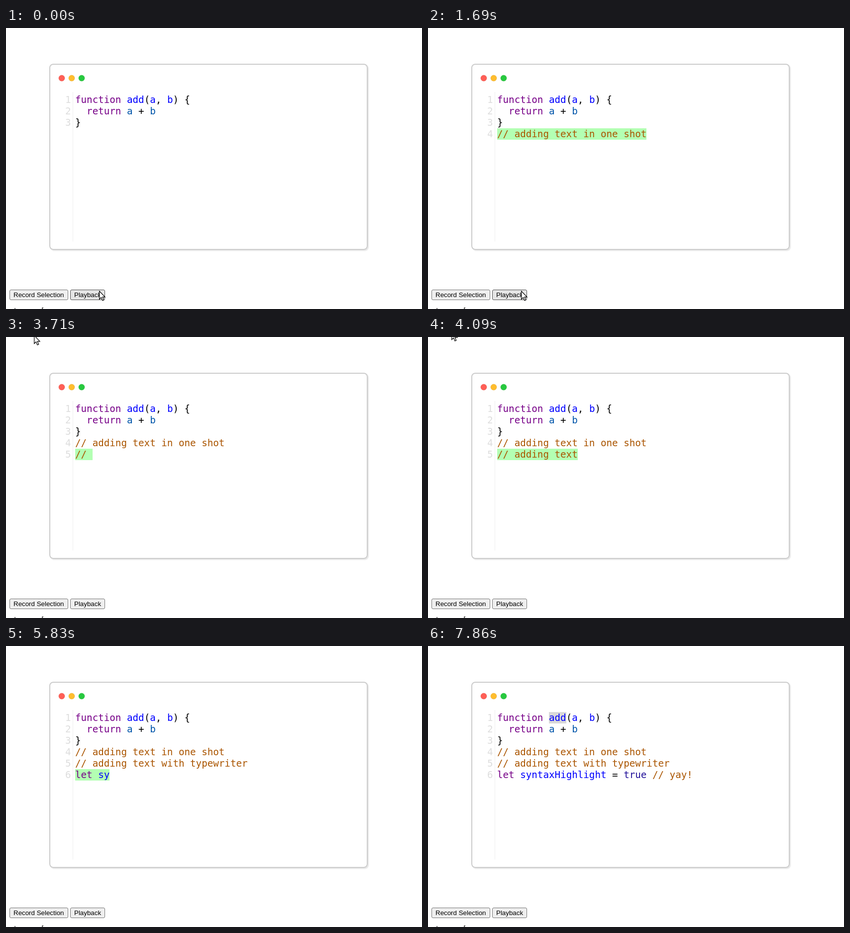
Recreate the animation shown at these times as an HTML page. Size 836 px wide and 566 px high, loop 8 s.

```html
<!DOCTYPE html>
<html lang="en">
<head>
<meta charset="utf-8">
<title>Code playback</title>
<style>
  html, body { margin: 0; width: 100%; height: 100%; overflow: hidden; background: #fff; }
  body { position: relative; }
  body > * { position: absolute; }
  .window {
    left: 87px; top: 72px; width: 640px; height: 375px; box-sizing: border-box;
    border: 2px solid #ccc; border-radius: 8px; box-shadow: 2px 2px 2px rgba(0, 0, 0, .1);
  }
  .lights { left: 105px; top: 94px; }
  .gutter { left: 134px; top: 129px; width: 1px; height: 301px; background: #eee; }
  #numbers, #code { top: 133px; font: 19.2px/23px "DejaVu Sans Mono", monospace; white-space: pre; }
  #numbers { left: 119px; color: #ddd; }
  #code { left: 139px; color: #000; }
  #code div { height: 23px; }
  .added, .selected { display: inline-block; height: 23px; vertical-align: top; }
  .added { background: #b3ffb3; }
  .selected { background: #d9d9d9; }
  .keyword { color: #708; }
  .def { color: #00f; }
  .local { color: #05a; }
  .atom { color: #219; }
  .comment { color: #a50; }
  .button {
    top: 527px; height: 21px; box-sizing: border-box; padding: 0 7px;
    border: 1px solid #767676; border-radius: 3px; background: #efefef; color: #000;
    font: 13.333px/19px "Liberation Sans", Arial, sans-serif; white-space: nowrap;
  }
  .button.hover { background: #e5e5e5; border-color: #4f4f4f; }
  .button.active { background: #f5f5f5; border-color: #8d8d8d; }
  .steps { left: 7px; top: 561px; margin: 0; font: 13px/15px "DejaVu Sans Mono", monospace; }
  #pointer { left: 0; top: 0; }
</style>
</head>
<body>
<div class="window"></div>
<svg class="lights" width="54" height="14" stroke-width=".5">
  <circle cx="7" cy="7" r="6" fill="#ff5f56" stroke="#e0443e"/>
  <circle cx="27" cy="7" r="6" fill="#ffbd2e" stroke="#dea123"/>
  <circle cx="47" cy="7" r="6" fill="#27c93f" stroke="#1aab29"/>
</svg>
<div class="gutter"></div>
<div id="numbers"></div>
<div id="code"></div>
<div class="button" style="left:7px">Record Selection</div>
<div class="button" id="playback" style="left:129px">Playback</div>
<pre class="steps">steps = [</pre>
<svg id="pointer" width="14" height="22">
  <path d="M.7 1V17.3L4.4 13.8L7 20L9.7 18.9L7.1 12.8H12Z" fill="#fff" stroke="#000" stroke-width="1.2"/>
</svg>
<script>
const DURATION = 8000;
const BASE = ['function add(a, b) {', '  return a + b', '}'];

// number: when the empty line appears; typed: [time, visible characters]; settled: highlight ends
const ADDITIONS = [
  { text: '// adding text in one shot', number: 690, settled: 2490, typed: [[1690, 26]] },
  { text: '// adding text with typewriter', number: 2660, settled: 5170,
    typed: [[3710, 3], [3830, 7], [3940, 10], [4090, 14], [4200, 18], [4340, 22], [4490, 26], [4600, 30]] },
  { text: 'let syntaxHighlight = true // yay!', number: 4690, settled: 7140,
    typed: [[5830, 6], [6000, 11], [6140, 16], [6310, 20], [6540, 28], [6710, 33], [6830, 34]] },
];
const POINTER = [[0, [187, 529]], [2000, [308, 523]], [2230, null], [3400, [56, -4]],
  [3940, [54, -5]], [4090, [47, -12]], [4200, [44, -14]], [4490, null]];
const BUTTON = [[0, 'hover'], [570, 'active'], [630, 'hover'], [2000, '']];
const SELECT_AT = 7860;

const $ = id => document.getElementById(id);
const valueAt = (steps, t, initial) =>
  steps.reduce((value, [time, next]) => t >= time ? next : value, initial);
const span = (name, text) => `<span class="${name}">${text}</span>`;

function highlight(line) {
  let context = '';
  return line.replace(/\/\/.*|\w+|=/g, token => {
    if (token.startsWith('//')) return span('comment', token);
    if (token === '=') { context = ''; return token; }
    if (/^(function|return|let)$/.test(token)) { context = token; return span('keyword', token); }
    if (token === 'true') return span('atom', token);
    return context ? span(context === 'return' ? 'local' : 'def', token) : token;
  });
}

function render(t) {
  const lines = BASE.map(highlight);
  if (t >= SELECT_AT) lines[0] = lines[0].replace(span('def', 'add'), match => span('selected', match));
  for (const { text, number, typed, settled } of ADDITIONS) {
    if (t < number) break;
    const html = highlight(text.slice(0, valueAt(typed, t, 0)));
    lines.push(t < settled ? span('added', html) : html);
  }
  $('code').innerHTML = lines.map(line => `<div>${line}</div>`).join('');
  $('numbers').textContent = lines.map((_, i) => i + 1).join('\n');
  $('playback').className = 'button ' + valueAt(BUTTON, t);

  const position = valueAt(POINTER, t);
  $('pointer').style.display = position ? '' : 'none';
  if (position) $('pointer').style.transform = `translate(${position[0]}px, ${position[1]}px)`;
}

const start = performance.now();
function tick() {
  render((performance.now() - start) % DURATION);
  requestAnimationFrame(tick);
}
tick();
</script>
</body>
</html>
```
